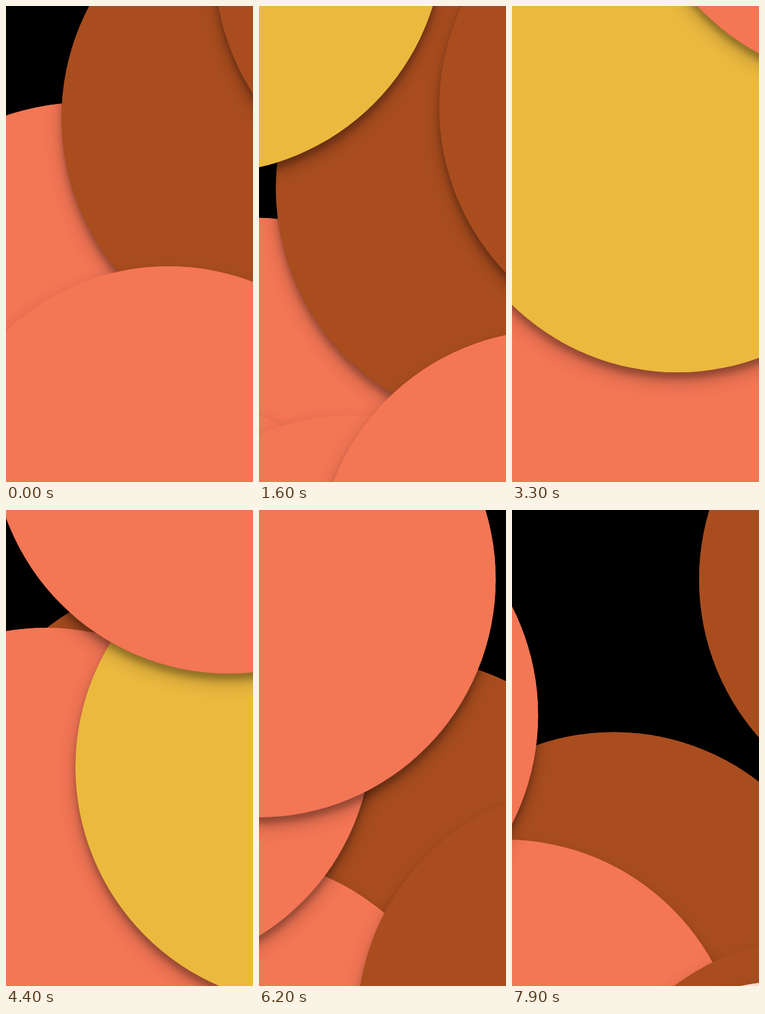
Recreate the animation shown at these times as an HTML page with a canvas. Size 400 by 768 pixels, loop 8000 ms.

```html
<!DOCTYPE html>
<html lang="en">
<head>
<meta charset="utf-8">
<title>Drifting discs</title>
<style>
  html, body { margin: 0; width: 100%; height: 100%; overflow: hidden; background: #000; }
  canvas { display: block; width: 100vw; height: 100vh; }
</style>
</head>
<body>
<canvas id="stage" width="400" height="768"></canvas>
<script>
const W = 400, H = 768, R = H / 2;
const LOOP = 8000, STEP = 100;
const CORAL = '#f37655', RUST = '#a94d1f', GOLD = '#ecb93f', BLUSH = '#fcd9cc';
const ctx = document.getElementById('stage').getContext('2d');

// Back to front: colour, centre at time t0 (s), velocity (px/s)
const discs = [
  { color: CORAL, t0: 0,   x: 125,  y: 540,  vx: -84,    vy: 116 },
  { color: RUST,  t0: 0,   x: 474,  y: 180,  vx: -39.1,  vy: 71.2 },
  { color: CORAL, t0: 7.9, x: -11,  y: 916,  vx: 20,     vy: -16.3 },
  { color: CORAL, t0: 0,   x: 263,  y: 804,  vx: -69,    vy: 150 },
  { color: RUST,  t0: 0,   x: 722,  y: -68,  vx: -28.8,  vy: 144.6 },
  { color: CORAL, t0: 1.6, x: 478,  y: 907,  vx: -147.6, vy: -118.9 },
  { color: GOLD,  t0: 3.3, x: 268,  y: 207,  vx: 207.8,  vy: 189 },
  { color: CORAL, t0: 3.3, x: 581,  y: -262, vx: -200.6, vy: 128.9 },
  { color: RUST,  t0: 7.9, x: 687,  y: 112,  vx: -110,   vy: 60 },
  { color: BLUSH, t0: 7.9, x: 448,  y: 1144, vx: -60,    vy: -120 }
];

const shadows = [
  { dy: 14, blur: 28, alpha: 0.25 },
  { dy: 10, blur: 10, alpha: 0.22 }
];

function drawDisc(d, t) {
  const x = d.x + d.vx * (t - d.t0);
  const y = d.y + d.vy * (t - d.t0);
  const reach = R + 50;
  if (x < -reach || x > W + reach || y < -reach || y > H + reach) return;
  ctx.beginPath();
  ctx.arc(x, y, R, 0, Math.PI * 2);
  ctx.fillStyle = d.color;
  for (const s of shadows) {
    ctx.shadowColor = `rgba(0,0,0,${s.alpha})`;
    ctx.shadowBlur = s.blur;
    ctx.shadowOffsetY = s.dy;
    ctx.fill();
  }
  ctx.shadowColor = 'transparent';
}

function draw(ms) {
  const t = Math.floor((ms % LOOP) / STEP) * STEP / 1000;
  ctx.fillStyle = '#000';
  ctx.fillRect(0, 0, W, H);
  for (const d of discs) drawDisc(d, t);
}

let start = null;
function tick(now) {
  if (start === null) start = now;
  draw(now - start);
  requestAnimationFrame(tick);
}
draw(0);
requestAnimationFrame(tick);
</script>
</body>
</html>
```
